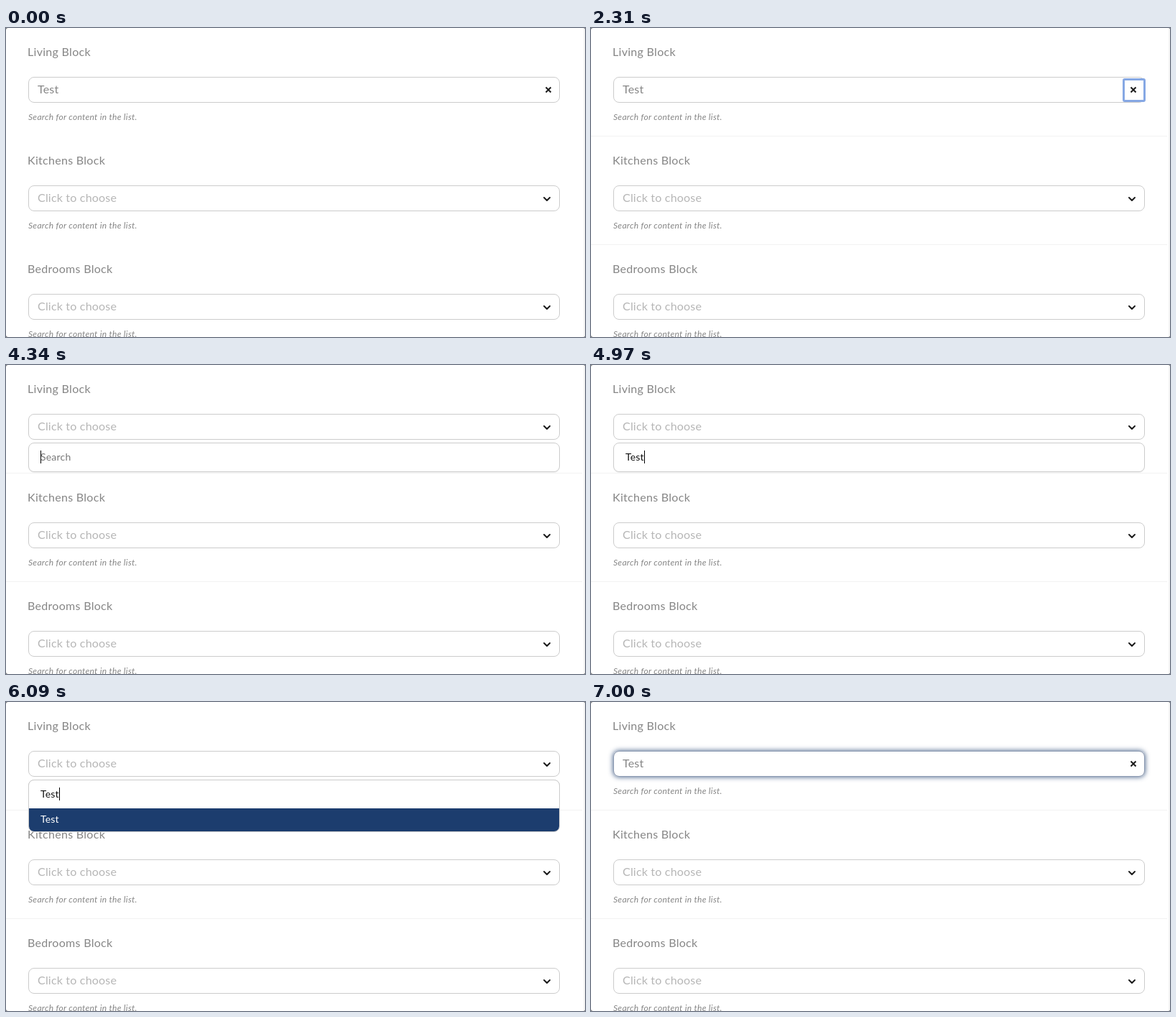
An HTML page for the animation above (8000 ms loop, 806x430 px).

```html
<!DOCTYPE html>
<html lang="en">
<head>
<meta charset="utf-8">
<title>Searchable select</title>
<style>
  html, body { margin: 0; width: 100%; height: 100%; overflow: hidden; background: #6b6b6b; }
  * { box-sizing: border-box; }

  .stage {
    position: relative; width: 806px; height: 430px; overflow: hidden;
    border-radius: 3px; background: #fff;
    font: 16px/20px Lato, "Open Sans", sans-serif; letter-spacing: .2px; color: #868686;
  }
  .stage::after { content: ""; position: absolute; inset: 0 0 0 auto; width: 2px; background: #f4f4f4; }

  .block { position: relative; height: 151px; }
  .block > *, .field > *, .layer > * { position: absolute; }
  .label { left: 30px; top: 23px; letter-spacing: .3px; }
  .hint { left: 31px; top: 116px; font: italic 12px/16px Lato, "Open Sans", sans-serif; letter-spacing: .3px; }
  .line { left: 0; top: 150px; width: 802px; height: 1px; background: #f2f2f2; }

  .field { left: 31px; top: 68px; width: 740px; height: 36px; border: 1px solid #ccc; border-radius: 8px; background: #fff; line-height: 32px; }
  .field span { left: 12px; top: 0; }
  .empty { color: #b6b6b6; }
  svg { fill: none; stroke: #1c1c1c; stroke-width: 2; }
  .chevron { left: 715px; top: 13px; stroke-linecap: round; stroke-linejoin: round; }
  .cross { left: 718px; top: 12px; }
  .ring { left: 708px; top: 1px; width: 32px; height: 33px; border: 3px solid #86a8e4; border-radius: 3px; }
  .glow { box-shadow: 0 0 6px 1px #1c3d6eb0; border-radius: 8px; }
  .field .glow { inset: -1px; border: 1px solid #8d9bb3; }

  .layer { position: absolute; left: 31px; top: 108px; width: 740px; font-size: 14px; z-index: 1; }
  .panel, .open { left: 0; top: 0; width: 740px; height: 41px; border: 1px solid #ccc; border-radius: 8px; background: #fff; }
  .panel { box-shadow: 0 1px 1px #0000000d; }
  .open { height: 73px; overflow: hidden; }
  .option { position: absolute; inset: 39px 0 0; padding: 5px 16px; background: #1c3d6e; color: #fff; }
  .layer .glow { left: 0; top: 0; width: 740px; height: 73px; border: 1px solid #a9bbdc; }
  .layer .glow::after { content: ""; position: absolute; left: 0; right: 0; top: 36px; height: 3px; background: #8fb1ee; }
  .word { left: 17px; top: 10px; color: #111; white-space: nowrap; }
  .word::after {
    content: ""; position: absolute; left: 100%; top: 1px; width: 1px; height: 18px;
    background: #000; animation: blink 8s step-end infinite;
  }
  .search { color: #777; }
  .search::after { left: 0; }

  .t { animation: 8s step-end infinite; }
  .line { animation-name: lines; }
  .value { animation-name: value; }
  .empty.t, .chevron.t { animation-name: cleared; }
  .ring { animation-name: ring; }
  .field .glow { animation-name: chosen; }
  .layer { animation-name: layer; }
  .open { animation-name: open; }
  .layer .glow { animation-name: focus; }
  .search { animation-name: search; }
  .w1 { animation-name: w1; }
  .w2 { animation-name: w2; }
  .w3 { animation-name: w3; }
  .w4 { animation-name: w4; }

  @keyframes lines   { 0% { opacity: 0 } .875%, 100% { opacity: 1 } }
  @keyframes value   { 0% { opacity: 1 } 29.75% { opacity: 0 } 87.5%, 100% { opacity: 1 } }
  @keyframes cleared { 0% { opacity: 0 } 29.75% { opacity: 1 } 87.5%, 100% { opacity: 0 } }
  @keyframes ring    { 0% { opacity: 0 } 28.875% { opacity: 1 } 29.75%, 100% { opacity: 0 } }
  @keyframes chosen  { 0% { opacity: 0 } 87.5%, 100% { opacity: 1 } }
  @keyframes layer   { 0% { opacity: 0 } 41.125% { opacity: 1 } 87.5%, 100% { opacity: 0 } }
  @keyframes open    { 0% { opacity: 0 } 76.125%, 100% { opacity: 1 } }
  @keyframes focus   { 0% { opacity: 0 } 85.75%, 100% { opacity: 1 } }
  @keyframes search  { 0% { opacity: 1 } 55.125%, 100% { opacity: 0 } }
  @keyframes w1      { 0% { opacity: 0 } 55.125% { opacity: 1 } 57.75%, 100% { opacity: 0 } }
  @keyframes w2      { 0% { opacity: 0 } 57.75% { opacity: 1 } 59.5%, 100% { opacity: 0 } }
  @keyframes w3      { 0% { opacity: 0 } 59.5% { opacity: 1 } 62.125%, 100% { opacity: 0 } }
  @keyframes w4      { 0% { opacity: 0 } 62.125%, 100% { opacity: 1 } }
  @keyframes blink {
    0%, 54.25%, 75.25% { opacity: 1 }
    48.125%, 69.125%, 82.25%, 100% { opacity: 0 }
  }
</style>
</head>
<body>
<div class="stage">
  <div class="block">
    <div class="label">Living Block</div>
    <div class="field">
      <div class="glow t"></div>
      <span class="value t">Test</span>
      <svg class="cross value t" width="10" height="10"><path d="M1.5 1.5l7 7m0-7l-7 7"/></svg>
      <span class="empty t">Click to choose</span>
      <svg class="chevron t" width="12" height="10"><path d="M2 3l4 4 4-4"/></svg>
      <div class="ring t"></div>
    </div>
    <div class="hint">Search for content in the list.</div>
    <div class="line t"></div>
  </div>

  <div class="block">
    <div class="label">Kitchens Block</div>
    <div class="field">
      <span class="empty">Click to choose</span>
      <svg class="chevron" width="12" height="10"><path d="M2 3l4 4 4-4"/></svg>
    </div>
    <div class="hint">Search for content in the list.</div>
    <div class="line t"></div>
  </div>

  <div class="block">
    <div class="label">Bedrooms Block</div>
    <div class="field">
      <span class="empty">Click to choose</span>
      <svg class="chevron" width="12" height="10"><path d="M2 3l4 4 4-4"/></svg>
    </div>
    <div class="hint">Search for content in the list.</div>
  </div>

  <div class="layer t">
    <div class="panel"></div>
    <div class="open t"><div class="option">Test</div></div>
    <div class="glow t"></div>
    <span class="word search t">Search</span>
    <span class="word w1 t">T</span>
    <span class="word w2 t">Te</span>
    <span class="word w3 t">Tes</span>
    <span class="word w4 t">Test</span>
  </div>
</div>
</body>
</html>
```
